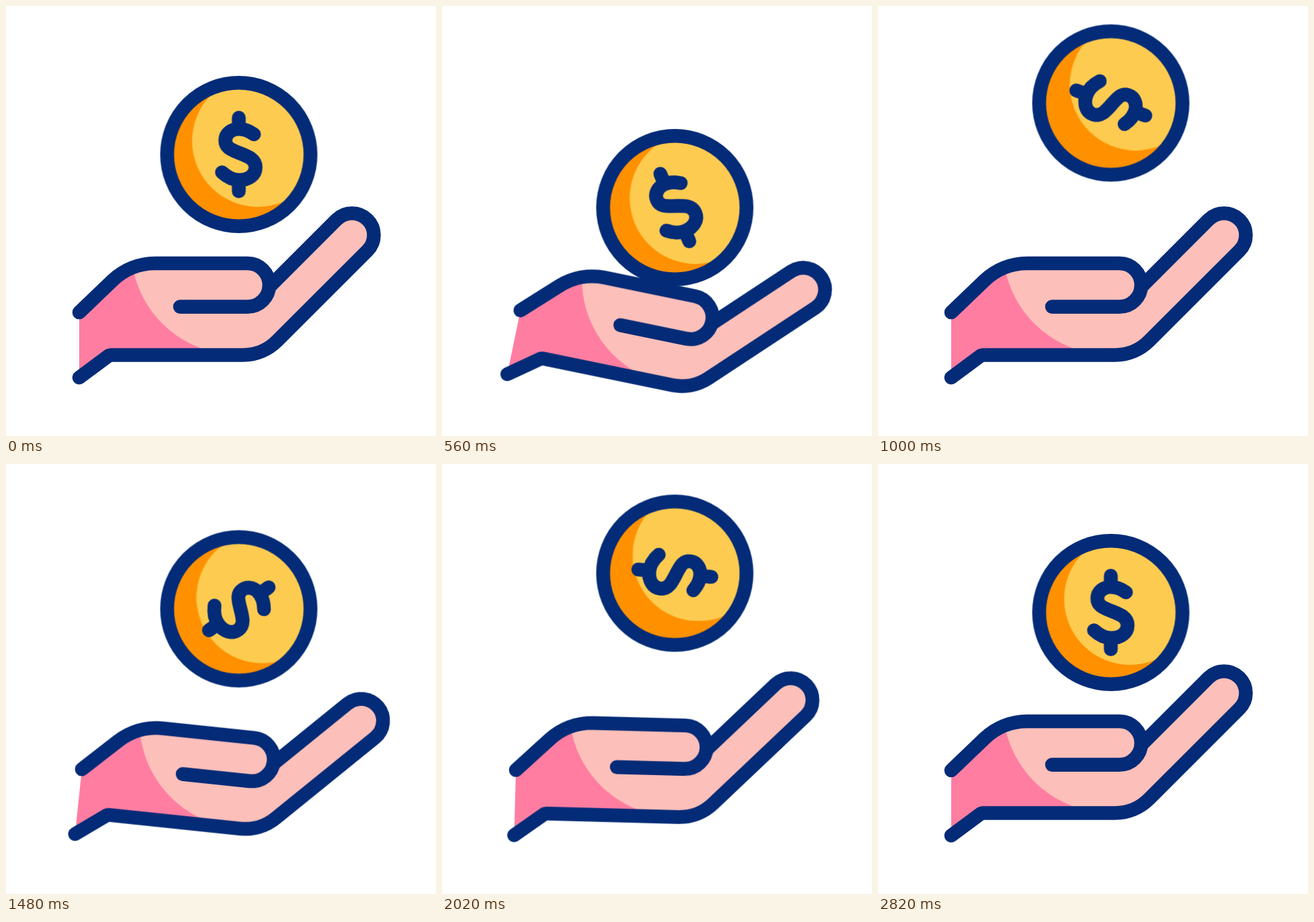
These frames come from a looping animation (640x640 px, 3.02 s). An HTML page:

```html
<!DOCTYPE html>
<html lang="en">
<head>
<meta charset="utf-8">
<title>Coin bouncing on a hand</title>
<style>
  html, body { margin: 0; width: 100%; height: 100%; overflow: hidden; background: #fff; }
  svg { display: block; width: 100vw; height: 100vh; }
  .line { fill: none; stroke: #042b77; stroke-width: 20.6; stroke-linecap: round; stroke-linejoin: round; }
  #hand { transform-origin: 127.7px 492.6px; }
</style>
</head>
<body>
<svg viewBox="0 0 640 640">
  <defs>
    <clipPath id="disc"><circle r="102"/></clipPath>
  </defs>
  <g id="hand">
    <path fill="#fdbfb9" d="M109 456 L158 409 A92 92 0 0 1 222 383 H359.5 A32.3 32.3 0 0 1 391.8 418
      L492 318 A32.5 32.5 0 0 1 538 364 L403.4 498.6 A71 71 0 0 1 353 519.5 H153.5 L109 553 Z"/>
    <path fill="#ff7da1" d="M109 456 L158 409 L189 391 A159 159 0 0 0 305 514 V519.5 H153.5 L109 553 Z"/>
    <path class="line" d="M109 553 L153.5 520 L156 519.5 H353 A71 71 0 0 0 403.4 498.6 L538 364
      A32.5 32.5 0 0 0 492 318 L392 418"/>
    <path class="line" d="M109 456 L158 409 A92 92 0 0 1 222 383 H359.5 A32.3 32.3 0 0 1 359.5 447.6 H259"/>
  </g>
  <g id="coin">
    <circle r="102" fill="#ff9000"/>
    <g clip-path="url(#disc)">
      <circle id="light" cx="28.5" cy="-20" r="98" fill="#fdcb50"/>
    </g>
    <circle class="line" r="106.7"/>
    <path id="sign" class="line" d="M0 -54.7 V-38 M0 38 V54.7
      M22.5 -30 C15 -35.5 8 -38 0 -38 C-11 -38 -20 -31 -20 -21 C-20 -10 -11 -7 0 -2.5
      C14 3 25 7 25 19 C25 31 14 38 1 38 C-9 38 -17 34 -25 26.5"/>
  </g>
</svg>
<script>
  const LOOP = 3020;
  const SMOOTH = 'cubic-bezier(.3333, 0, .6667, 1)';
  const DROP = 'cubic-bezier(.3333, 0, .6667, .1667)';

  // Each step: time in ms, value, easing towards the next step
  function play(id, toTransform, steps) {
    const last = steps[steps.length - 1];
    const frames = [[0, steps[0][1], 'linear'], ...steps, [LOOP, last[1]]]
      .map(([time, value, easing = 'linear']) =>
        ({ offset: time / LOOP, transform: toTransform(value), easing }));
    document.getElementById(id).animate(frames, { duration: LOOP, iterations: Infinity });
  }

  // Rest, dip, peak, dip, peak, rest
  const bounce = (rest, dip, peak) => [
    [200, rest, DROP],
    [600, dip, SMOOTH],
    [1000, peak, DROP],
    [1700, dip, SMOOTH],
    [2100, peak, SMOOTH],
    [2800, rest]
  ];

  const turn = a => `rotate(${a}deg)`;

  play('hand', turn, bounce(0, 15, 0));
  play('coin', y => `translate(346.5px, ${y}px)`, bounce(221, 323, 144.4));
  play('sign', turn, bounce(0, -30, 110));
  play('light', ([x, y]) => `translate(${x}px, ${y}px)`, [
    [200, [0, 0], DROP],
    [600, [3, 7.5], SMOOTH],
    [1000, [8.5, -7.5], SMOOTH],
    [1480, [6.5, 3]],
    [1700, [3, 7.5], SMOOTH],
    [2100, [7, -8.2], SMOOTH],
    [2480, [1.2, -4.5]],
    [2800, [0, 0]]
  ]);
</script>
</body>
</html>
```
